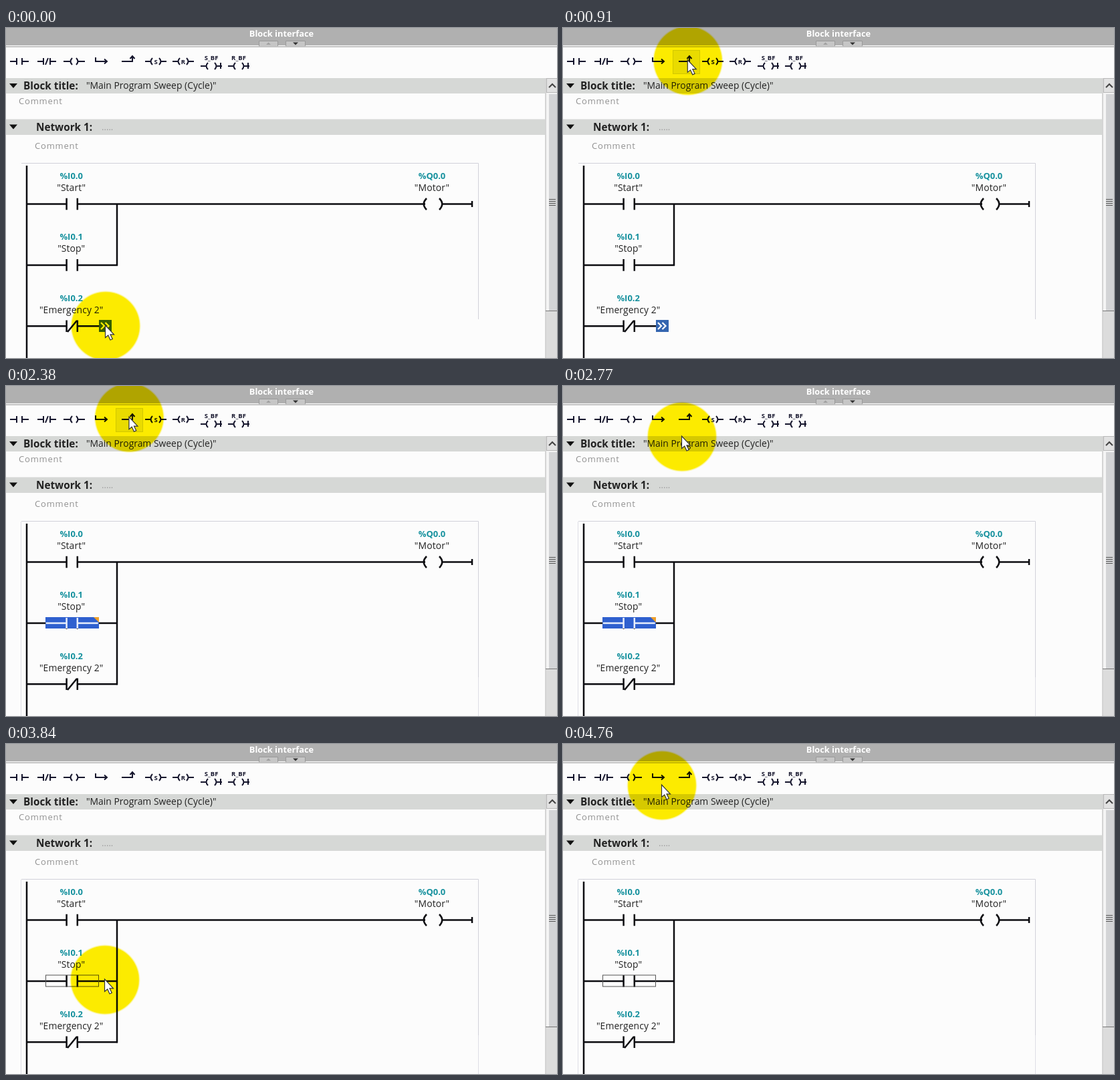
An HTML page for the animation above (4830 ms loop, 824x494 px).

```html
<!DOCTYPE html>
<html lang="en">
<head>
<meta charset="utf-8">
<title>Ladder editor</title>
<style>
html, body { margin: 0; width: 100%; height: 100%; overflow: hidden; background: #fcfcfc; }
svg { display: block; width: 824px; height: 494px; font: 13.9px "Open Sans", "Noto Sans", sans-serif; }
text { fill: #222; white-space: pre; }
.wire { fill: none; stroke: #0c0c10; stroke-width: 2.5; }
.icon { fill: none; stroke: #15152c; stroke-width: 2; }
.icon text { fill: #15152c; stroke: none; font-size: 9.5px; font-weight: 700; text-anchor: middle; }
.tag { font-weight: 700; font-size: 13px; fill: #16919e; text-anchor: middle; }
.name { text-anchor: middle; letter-spacing: .1px; }
.head { font-weight: 700; font-size: 15.3px; }
.note { font-size: 13px; letter-spacing: .8px; fill: #929292; }
#spot { mix-blend-mode: multiply; }
</style>
</head>
<body>
<svg viewBox="0 0 824 494">
  <defs>
    <radialGradient id="glow">
      <stop offset=".945" stop-color="#ffee00"/>
      <stop offset=".975" stop-color="#ffee00" stop-opacity=".3"/>
      <stop offset="1" stop-color="#ffee00" stop-opacity="0"/>
    </radialGradient>
  </defs>
  <rect width="824" height="494" fill="#fcfcfc"/>

  <!-- title strip -->
  <rect width="824" height="26" fill="#b0b0b0"/>
  <path d="M0 28H824" stroke="#8c8c8c"/>
  <path d="M378.5 27V19.5H406.5V27M418.5 27V19.5H447.5V27" fill="#c6c6c6" stroke="#999"/>
  <path d="M389 25L392.5 21.5L396 25Z" fill="#a0a0a0"/>
  <path d="M429 21.500H437L433 25.500Z" fill="#333"/>
  <text x="412" y="13" text-anchor="middle" font-size="12.8" font-weight="700" style="fill:#fff">Block interface</text>

  <!-- section headers -->
  <path d="M0 75H806V98H0ZM0 136.5H806V160H0Z" fill="#d6d8d6"/>
  <path d="M5 83H17L11 90ZM5 144.5H17L11 151.5Z" fill="#111"/>
  <text class="head" x="26" y="92">Block title:</text>
  <text x="120" y="91">"Main Program Sweep (Cycle)"</text>
  <text class="note" x="19" y="114">Comment</text>
  <text class="head" x="45" y="154">Network 1:</text>
  <text x="143" y="153" font-size="13" style="fill:#999">.....</text>
  <text class="note" x="43" y="181">Comment</text>

  <!-- scroll bar -->
  <rect x="806" y="75" width="18" height="419" fill="#f4f4f4"/>
  <path d="M807 75V494" stroke="#b4b4b4"/>
  <rect x="808.5" y="75.5" width="17" height="21" fill="#e2e2e2" stroke="#b8b8b8"/>
  <path d="M812 89L817 84L822 89" fill="none" stroke="#444" stroke-width="2"/>
  <rect x="812" y="99" width="12" height="324" fill="#d3d4d6"/>
  <path d="M807 423.5H824" stroke="#777"/>
  <rect x="808" y="424" width="16" height="70" fill="#dcdcdc"/>
  <path d="M817 256V267" stroke="#555" stroke-width="10" stroke-dasharray="1 2"/>

  <rect id="button" x="164.5" y="33.5" width="40" height="35" fill="#e9ebea" stroke="#d2d6d6"/>
  <g id="tools" class="icon"></g>

  <!-- network -->
  <path d="M23 202.5H706.5V436" fill="none" stroke="#d2d2da"/>
  <path id="side" d="M22.5 203V494M706.5 436V494" fill="none" stroke="#dedee6"/>
  <g id="ladder" class="wire"></g>
  <path id="tail" class="wire"/>
  <path id="join" class="wire"/>
  <g id="arrows">
    <rect x="139" y="437" width="19" height="18" fill="#3566b0"/>
    <path d="M142 441l5 5l-5 5M148.5 441l5 5l-5 5" fill="none" stroke="#fff" stroke-width="2.2"/>
  </g>
  <g id="picked">
    <rect x="59" y="346" width="80" height="17" fill="#2f60cf"/>
    <path id="inverse" fill="none" stroke="#e8eefc" stroke-width="2.5"/>
    <path d="M131 346H139V354Z" fill="#eea02c"/>
  </g>
  <rect id="outline" x="59.5" y="346" width="79" height="17" fill="none" stroke="#555"/>
  <g id="labels"></g>

  <g id="tip">
    <rect x="181.5" y="71.5" width="181" height="20" fill="#fdf3a8" stroke="#a9a58a"/>
    <path d="M188 75L196 81.5L188 88Z" fill="#111"/>
    <text x="202" y="86" font-size="14">Close branch [Shift+F9]</text>
  </g>

  <circle id="spot" r="53" fill="url(#glow)"/>
  <path id="pointer" d="M-.5 -1V17.5L3.8 14L7 21L10.300 19.500L7 12.800H12.500Z" fill="#fff" stroke="#333" stroke-width="1.2"/>
</svg>
<script>
const LOOP = 4830, STEP = 132.3, LEAD = 16;
const $ = id => document.getElementById(id);
const show = (id, on) => $(id).setAttribute('visibility', on ? 'visible' : 'hidden');
const line = d => `<path d="${d}"/>`;

// a symbol with leads: half = lead reach, gap = half the opening
const leads = (x, y, half, gap) => `M${x - half} ${y}H${x - gap}M${x + gap} ${y}H${x + half}`;
const bars = (x, y, gap, h) => `M${x - gap} ${y - h}v${2 * h}M${x + gap} ${y - h}v${2 * h}`;
const parens = (x, y, gap, h) =>
  `M${x - gap} ${y - h}q${-h} ${h} 0 ${2 * h}M${x + gap} ${y - h}q${h} ${h} 0 ${2 * h}`;

const contact = (x, gap) => line(leads(x, 50, 14, gap) + bars(x, 50, gap, 5));
const coil = (x, y, gap, mark = '') =>
  line(leads(x, y, 16, gap + 2.5) + parens(x, y, gap, 5)) + `<text x="${x}" y="${y + 3.5}">${mark}</text>`;
const bitField = (x, mark) => coil(x, 57, 5) + line(`M${x + 14} 52v9`) + `<text x="${x}" y="48">${mark}</text>`;

$('tools').innerHTML =
  contact(20, 4) + contact(61, 5) + line('M59 55L63 45') + coil(102, 50, 3) +
  line('M134 44V50H150M147 46.5L151 50L147 53.5') +
  line('M173 50H189V42M185.5 46L189 42L192.5 46') +
  coil(224, 50, 5, 'S') + coil(265, 50, 5, 'R') + bitField(307, 'S_BF') + bitField(348, 'R_BF');

const TOP = 263.5, PITCH = 91.4;
const rung = n => TOP + n * PITCH;
$('ladder').innerHTML = line('M31 206V494') +
  [0, 1, 2].map(n => line(`M31 ${rung(n)}H90` + bars(98.7, rung(n), 8.1, 8.8))).join('') +
  line(`M107 ${TOP}H627M651 ${TOP}H697M697 259v9` + parens(638.5, TOP, 9.500, 8.500)) +
  line(`M107 ${rung(1)}H167M92 455L106 438`);
$('inverse').setAttribute('d', leads(98.7, rung(1), 39, 8.1) + bars(98.7, rung(1), 8.1, 8));

const label = (x, y, tag, name) =>
  `<text class="tag" x="${x}" y="${y - 37.5}">${tag}</text>` +
  `<text class="name" x="${x}" y="${y - 19.5}">"${name}"</text>`;
$('labels').innerHTML = label(637, TOP, '%Q0.0', 'Motor') +
  ['Start', 'Stop', 'Emergency 2'].map((name, n) => label(97.7, rung(n), `%I0.${n}`, name)).join('');

// pointer path: step, x, y
const route = [
  [0, 149, 446], [1, 149, 446], [3, 112, 200], [4, 132, 105], [6, 187, 49], [20, 184, 47],
  [21, 178, 76], [22, 145, 432], [24, 166, 414], [26, 102, 356], [29, 148, 353],
  [34, 148, 390], [36, 148, 62]
];

function at(step) {
  const i = Math.max(1, route.findIndex(p => p[0] >= step));
  const [a, b] = [route[i - 1], route[i]];
  const k = (step - a[0]) / (b[0] - a[0]);
  return [1, 2].map(n => a[n] + (b[n] - a[n]) * k);
}

function draw(now) {
  const step = Math.min(36, Math.floor((now % LOOP + LEAD) / STEP));
  const [x, y] = at(step);
  const within = (from, to) => step >= from && step < to;
  const closed = step >= 15;

  for (const id of ['spot', 'pointer']) $(id).setAttribute('transform', `translate(${x} ${y})`);
  show('button', within(6, 21));
  show('tip', within(10, 14));
  show('arrows', !closed);
  show('side', closed);
  show('picked', within(15, 27));
  show('outline', step >= 27);
  $('tail').setAttribute('d', `M107 ${rung(2)}H${closed ? 167 : 140}`);
  $('join').setAttribute('d', `M166 ${TOP}V${rung(closed ? 2 : 1) + 1}`);
  $('join').style.stroke = step === 24 ? '#5d7078' : '';
}

function loop() {
  draw(performance.now());
  requestAnimationFrame(loop);
}
loop();
</script>
</body>
</html>
```
